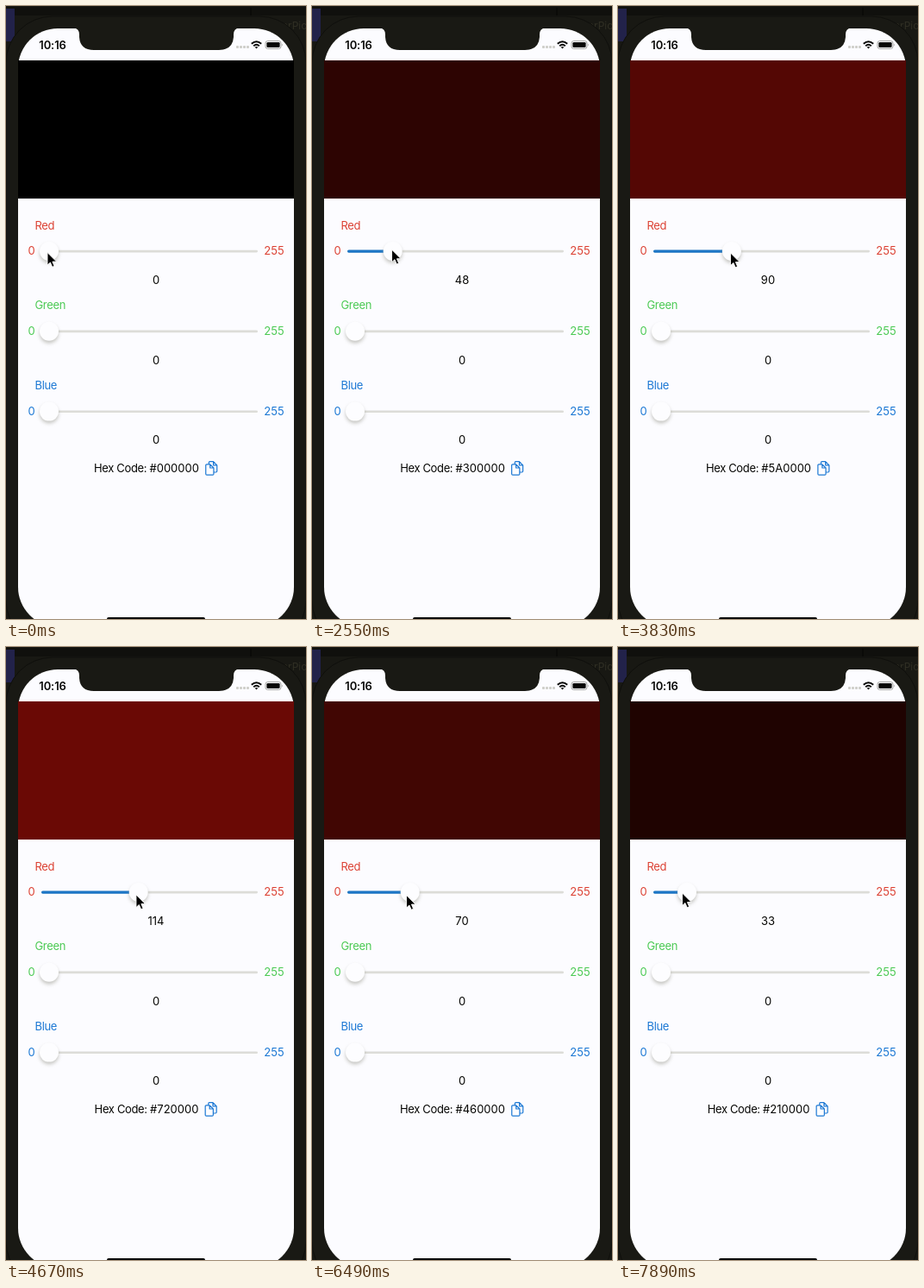
An HTML page for the animation above (7990 ms loop, 348 by 710 pixels).

```html
<!DOCTYPE html>
<html lang="en">
<head>
<meta charset="utf-8">
<title>Colour sliders</title>
<style>
  html, body { margin: 0; width: 100%; height: 100%; overflow: hidden; background: #181813; }
  svg { display: block; width: 348px; height: 710px; }
  text { font: 13px Inter, "Open Sans", sans-serif; fill: #060604; }
  .label { letter-spacing: -.35px; }
  .clock { font-weight: 600; letter-spacing: -.1px; }
  .mid { text-anchor: middle; }
  .red text { fill: #dc4234; }
  .green text { fill: #4cca54; }
  .blue text { fill: #1c78d4; }
  .row .value { fill: #060604; }
  .line { fill: #fcfcff; stroke: #1c78d4; stroke-width: 1.2; stroke-linejoin: round; }
</style>
</head>
<body>
<svg viewBox="0 0 348 710">
  <defs>
    <filter id="soft" x="-50%" y="-50%" width="200%" height="200%">
      <feGaussianBlur stdDeviation="2"/>
    </filter>
  </defs>

  <!-- desktop and phone body -->
  <rect width="348" height="710" fill="#181813"/>
  <rect y="1" width="348" height="10" fill="#10100d"/>
  <rect y="3" width="10" height="38" fill="#22224a"/>
  <path d="M284 2v9" stroke="#050504"/>
  <text x="320" y="27" style="fill:#302f24;font-size:12px">erPicker</text>
  <rect x="0" y="12" width="348" height="730" rx="54" fill="#191914" stroke="#0f0f0c"/>

  <!-- screen -->
  <rect x="14" y="26" width="320" height="693" rx="46" fill="#fcfcff"/>
  <path d="M78 25Q85 26 85 33V36Q86 51 102 51H247Q263 51 264 36V33Q264 26 271 25Z" fill="#191914"/>
  <text class="clock mid" x="54" y="49.7">10:16</text>
  <g fill="#cfcfca">
    <rect x="267" y="46" width="3" height="3" rx="1"/>
    <rect x="271" y="46" width="3" height="3" rx="1"/>
    <rect x="275" y="46" width="3" height="3" rx="1"/>
    <rect x="279" y="46" width="3" height="3" rx="1"/>
  </g>
  <g fill="none" stroke="#060604" stroke-width="2">
    <path d="M284.8 43.8Q290.5 38.6 296.2 43.8M287.2 46.3Q290.5 43.3 293.8 46.3"/>
    <path d="M288.7 47.6Q290.5 46.2 292.3 47.6L290.5 49.6Z" fill="#060604" stroke="none"/>
  </g>
  <rect x="301" y="40.5" width="18" height="9" rx="2.6" fill="none" stroke="#9c9c98" stroke-width=".9"/>
  <rect x="302.4" y="41.9" width="15.2" height="6.2" rx="1.4" fill="#060604"/>
  <path d="M320.2 43.5q1.6 1.5 0 3z" fill="#9c9c98"/>
  <rect id="panel" x="14" y="63" width="320" height="160"/>

  <g id="rows"></g>

  <text id="hex" class="mid" x="163" y="539.7"><tspan class="label">Hex Code: </tspan><tspan id="code">#000000</tspan></text>
  <g id="copy" class="line">
    <path d="M5.6 .8H9.6L13.8 5V12Q13.8 13.2 12.6 13.2H5.6Q4.4 13.2 4.4 12V2Q4.4 .8 5.6 .8ZM9.6 .8V5H13.8"/>
    <path d="M2 4H5.8L10 8.2V15.2Q10 16.4 8.8 16.4H2Q.8 16.4 .8 15.2V5.2Q.8 4 2 4ZM5.8 4V8.2H10"/>
  </g>
  <rect x="117" y="708" width="114" height="4" rx="2" fill="#000"/>

  <path id="cursor" d="M0 0V14.6L3.4 11.5L5.7 16.8L8.1 15.8L5.9 10.6H10.6Z" fill="#000" stroke="#fff" stroke-width=".9"/>
</svg>
<script>
  const LOOP = 7990;
  const $ = id => document.getElementById(id);

  // time, red value, cursor tip x, cursor tip y
  const drag = [
    [0, 0, 48, 285.5], [650, 0, 48, 285.5], [1870, 29, 75.5, 284],
    [3130, 67, 109.5, 281], [3830, 90, 130.5, 286], [4700, 114, 151, 287],
    [5697, 91, 128.5, 287.5], [6490, 70, 109.5, 287.5], [7890, 33, 74.5, 285],
    [8100, 28, 70, 285]
  ];

  $('rows').innerHTML = ['Red', 'Green', 'Blue'].map((name, i) => `
    <g class="row ${name.toLowerCase()}" transform="translate(0 ${i * 92.8})">
      <text class="label" x="33.5" y="258.7">${name}</text>
      <text x="25.5" y="288.2">0</text>
      <text x="299.3" y="288.2">255</text>
      <rect x="41" y="282.8" width="251" height="2.6" rx="1.3" fill="#dcdcd8"/>
      <rect class="fill" x="41" y="282.5" width="0" height="3.2" rx="1.6" fill="#1c76c6"/>
      <g class="knob" transform="translate(50 284)">
        <circle cy="2.8" r="10.8" fill="#8c8c80" opacity=".5" filter="url(#soft)"/>
        <circle r="11" fill="#fdfdff"/>
      </g>
      <text class="value mid" x="174" y="321.8">0</text>
    </g>`).join('');

  const red = document.querySelector('.red');
  const fill = red.querySelector('.fill');
  const knob = red.querySelector('.knob');
  const value = red.querySelector('.value');

  const slope = (i, k) => (drag[i + 1][k] - drag[i][k]) / (drag[i + 1][0] - drag[i][0]);

  // Tangents flatten at rests and turning points.
  function tangent(i, k) {
    if (i === 0) return 0;
    if (i === drag.length - 1) return slope(i - 1, k);
    const a = slope(i - 1, k), b = slope(i, k);
    return a * b > 0 ? (a + b) / 2 : 0;
  }

  function at(t, k) {
    let i = 0;
    while (i < drag.length - 2 && t >= drag[i + 1][0]) i++;
    const span = drag[i + 1][0] - drag[i][0];
    const s = (t - drag[i][0]) / span, r = 1 - s;
    return drag[i][k] * (1 + 2 * s) * r * r + drag[i + 1][k] * (3 - 2 * s) * s * s
      + span * s * r * (tangent(i, k) * r - tangent(i + 1, k) * s);
  }

  function gestureTime(t) {
    if (t < 660) return 0;
    const group = Math.floor((t - 1870) / 140);
    const phase = t - 1870 - group * 140;
    const step = phase < 100 ? 0 : phase < 120 ? 1 : 2;
    return 1870 + (group + step / 3) * 140;
  }

  function draw(t) {
    const u = gestureTime(t);
    const v = Math.max(0, Math.round(at(u, 1)));
    const x = 50 + v * .91;
    $('panel').setAttribute('fill', `rgb(${v * .93} ${v * .08} ${v * .04})`);
    fill.setAttribute('width', v ? x - 41 : 0);
    knob.setAttribute('transform', `translate(${x} 284)`);
    value.textContent = v;
    $('code').textContent = '#' + v.toString(16).toUpperCase().padStart(2, '0') + '0000';
    const iconX = 163 + $('hex').getComputedTextLength() / 2 + 7;
    $('copy').setAttribute('transform', `translate(${iconX} 526.8)`);
    $('cursor').setAttribute('transform', `translate(${at(u, 2)} ${at(u, 3)})`);
  }

  const start = performance.now();
  function tick() {
    draw((performance.now() - start) % LOOP);
    requestAnimationFrame(tick);
  }
  tick();
</script>
</body>
</html>
```
